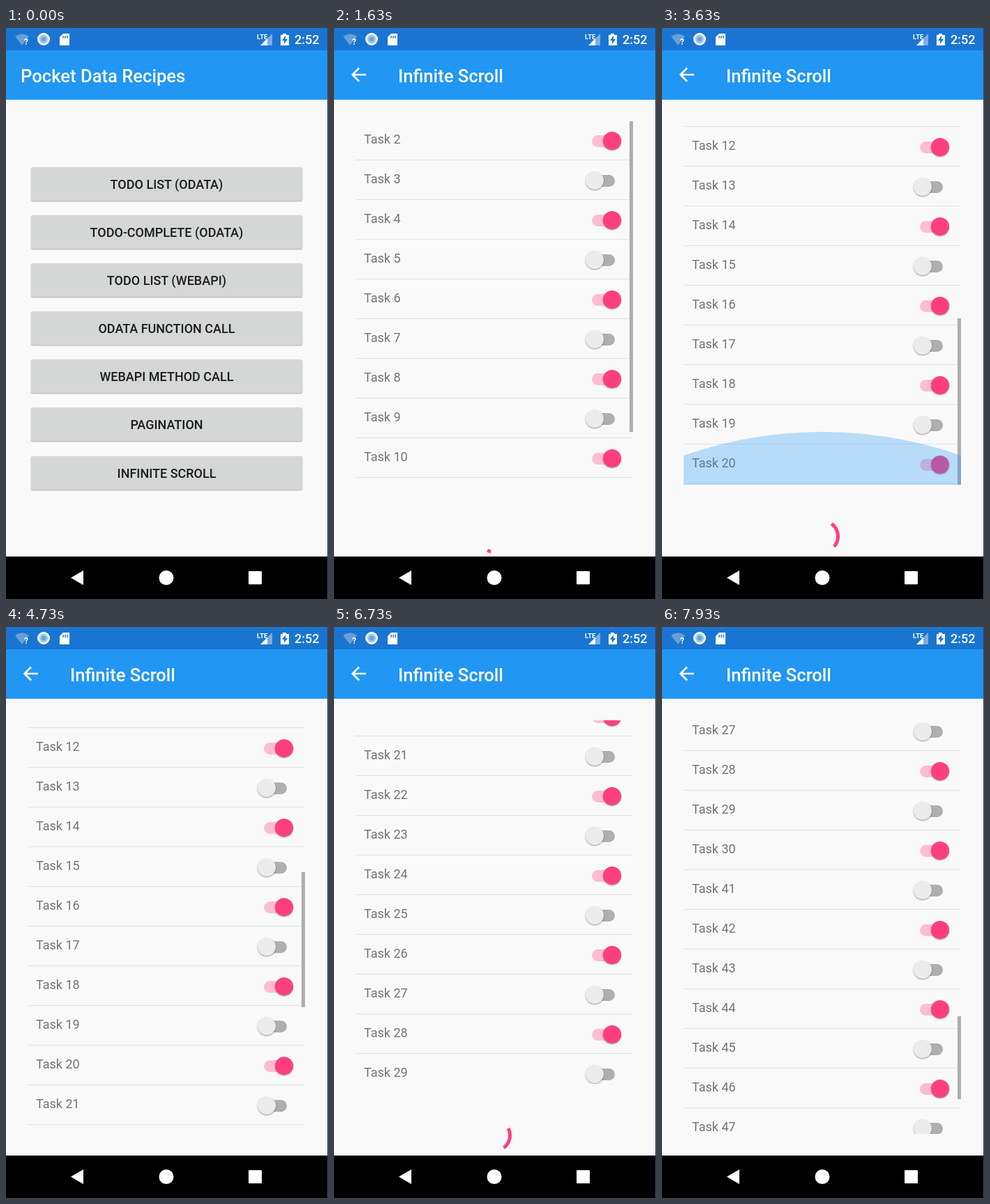
Write an HTML page that moves like this. It is 462 px wide and 820 px high and loops after 8 s.

```html
<!DOCTYPE html>
<html lang="en">
<head>
<meta charset="utf-8">
<title>Infinite scroll demo</title>
<style>
  :root { --loop: 8s linear infinite; --paper: #f9f9fa; --pink: #fd3f80; --status: #1a75d2; }
  html, body { margin: 0; width: 100%; height: 100%; overflow: hidden; }
  body { position: relative; background: var(--paper); font-family: Roboto, sans-serif; }
  #stage { position: absolute; inset: 0 auto auto 0; width: 462px; height: 820px; overflow: hidden; background: var(--paper); }
  #stage * { box-sizing: border-box; }
  #stage > * { position: absolute; }

  /* Fixed chrome */
  .status { left: 0; top: 0; width: 462px; height: 32px; background: var(--status); }
  .toolbar { left: 0; top: 32px; width: 462px; height: 71px; background: #2196f3; }
  .title { top: 33px; height: 73px; line-height: 73px; font-size: 25.6px; font-weight: 500; color: #fff; white-space: nowrap; }
  .nav { left: 0; top: 759px; width: 462px; height: 61px; background: #000; }
  .edge { left: 461px; top: 0; width: 1px; height: 820px; background: #34466a; }
  .icons { left: 0; top: 0; }
  .clock { font: 500 18px Roboto, sans-serif; }
  .lte { font: 700 9.5px Roboto, sans-serif; }

  /* Menu page */
  .menu { left: 36px; top: 200px; width: 389px; }
  .button {
    position: relative; height: 48px; margin-bottom: 21.1px; overflow: hidden; border-radius: 2px;
    background: #d5d6d6; box-shadow: 0 1px 2px #0005; line-height: 49px;
    text-align: center; font-size: 18px; font-weight: 500; color: #1c1c1c;
  }
  .ripple { position: absolute; left: -16px; top: -186px; width: 420px; height: 420px; border-radius: 50%; background: #0002; animation: ripple var(--loop); }
  .home-title { left: 21px; animation: leave var(--loop); }

  /* List page */
  .page { left: 0; top: 103px; width: 462px; height: 656px; background: var(--paper); animation: enter var(--loop); }
  .page-title { left: 92px; animation: enter var(--loop); }
  .arrow { animation: enter var(--loop); }
  .view { position: absolute; left: 31px; top: 31px; width: 398px; height: 594px; overflow: hidden; }
  .busy .view { height: 522px; }
  .list { margin: 0; padding: 0; list-style: none; animation: scroll var(--loop), load var(--loop); }
  .row { position: relative; height: 57px; padding-left: 12px; border-bottom: 1px solid #e2e2e4; line-height: 54px; font-size: 18px; color: #737373; }
  .track { position: absolute; left: 339px; top: 21px; width: 33px; height: 17px; border-radius: 9px; background: #afafaf; }
  .thumb { position: absolute; left: 330px; top: 16px; width: 26px; height: 26px; border-radius: 50%; background: #ebebeb; box-shadow: 0 1px 2px #0006; }
  .on .track { background: #fcbdd2; }
  .on .thumb { left: 355px; background: var(--pink); }
  .bar { position: absolute; right: 0; width: 5px; background: #aeaeae; animation: bar var(--loop); }
  .glow { position: absolute; left: -400px; bottom: -1198px; width: 1198px; height: 1198px; border-radius: 50%; background: #2196f34d; animation: glow var(--loop); }
  .spinner { position: absolute; left: 200px; top: 597px; visibility: hidden; }
  .busy .spinner { visibility: visible; }

  @keyframes ripple {
    0%, .9% { transform: scale(0); opacity: 1; }
    3.6% { transform: scale(1); opacity: 1; }
    6%, 100% { transform: scale(1); opacity: 0; }
  }
  @keyframes leave { 0%, 4.1% { opacity: 1; } 5.6%, 100% { opacity: 0; } }
  @keyframes enter { 0%, 4.1% { opacity: 0; } 6.6%, 100% { opacity: 1; } }
  @keyframes load { 0%, 16.24% { opacity: 0; } 16.25%, 100% { opacity: 1; } }
  @keyframes scroll {
    0%, 18.1% { transform: none; }
    20.3%, 37.1% { transform: translateY(-58px); }
    38.75% { transform: translateY(-130px); }
    43.75%, 57.9% { transform: translateY(-619px); }
    59.125% { transform: translateY(-615px); }
    63.375%, 65.875% { transform: translateY(-900px); }
    69.125% { transform: translateY(-1270px); }
    71.75%, 94.6% { transform: translateY(-1687px); }
    99.1%, 100% { transform: translateY(-2065px); }
  }
  @keyframes bar {
    0%, 16.24% { top: 0; height: 446px; opacity: 0; }
    16.25%, 22.5% { top: 0; height: 446px; opacity: 1; }
    25.6% { top: 0; height: 446px; opacity: 0; }
    37.1% { top: 30px; height: 290px; opacity: 0; }
    37.4% { top: 30px; height: 290px; opacity: 1; }
    43% { top: 296px; height: 290px; opacity: 1; }
    43.75%, 48.7% { top: 283px; height: 241px; opacity: 1; }
    51.9% { top: 283px; height: 241px; opacity: 0; }
    57.9% { top: 218px; height: 194px; opacity: 0; }
    58.3%, 59.125% { top: 218px; height: 194px; opacity: 1; }
    63.3% { top: 313px; height: 194px; opacity: 1; }
    63.375%, 65.875% { top: 234px; height: 147px; opacity: 1; }
    69.125% { top: 329px; height: 147px; opacity: 1; }
    71.7% { top: 439px; height: 147px; opacity: 1; }
    71.8%, 75.5% { top: 386px; height: 121px; opacity: 1; }
    78.7% { top: 386px; height: 121px; opacity: 0; }
    94.6% { top: 351px; height: 119px; opacity: 0; }
    95% { top: 354px; height: 119px; opacity: 1; }
    99.1%, 100% { top: 425px; height: 119px; opacity: 1; }
  }
  @keyframes glow {
    0%, 43.6% { transform: none; opacity: 0; }
    45.1%, 45.8% { transform: translateY(-76px); opacity: 1; }
    53%, 100% { transform: none; opacity: 0; }
  }
</style>
</head>
<body>
<div id="stage">
  <div class="menu"></div>
  <div class="page">
    <div class="view">
      <ul class="list"></ul>
      <div class="bar"></div>
      <div class="glow"></div>
    </div>
    <svg class="spinner" width="60" height="60">
      <circle class="arc" cx="30" cy="30" r="22.5" pathLength="360" fill="none" stroke="#fd3f80" stroke-width="5"/>
    </svg>
  </div>
  <div class="status"></div>
  <div class="toolbar"></div>
  <div class="title home-title">Pocket Data Recipes</div>
  <div class="title page-title">Infinite Scroll</div>
  <div class="nav"></div>
  <svg class="icons" width="462" height="820" fill="#fff">
    <path d="M13 12Q23 5 33 12L23 25Z" fill="#689fdb"/>
    <text class="lte" x="26" y="24" style="font-size:12px">?</text>
    <circle cx="54" cy="16" r="7.7" fill="#a6c8ec" stroke="#fff" stroke-width="2.6"/>
    <circle cx="54" cy="16" r="3.5" fill="#6aa4e0"/>
    <path d="M82 8H91V25H77V13Z"/>
    <path d="M82 11v4M85 11v4M88 11v4" stroke="#1a75d2" stroke-width="1.4"/>
    <text class="lte" x="360" y="16">LTE</text>
    <path d="M382 8V25H365Z" fill="#7aaee4"/>
    <path d="M375 15V25H365Z"/>
    <path d="M397 8h5v2h4v15h-12V10h3Z"/>
    <path d="M401 11l-5 7h3v5l5-7h-3Z" fill="#1a75d2"/>
    <text class="clock" x="414" y="23">2:52</text>
    <path class="arrow" d="M46 67H27M36 57.5L26.5 67L36 76.5" fill="none" stroke="#fff" stroke-width="2.6"/>
    <path d="M93 789.5L111 779V800Z"/>
    <circle cx="230" cy="789.5" r="10.5"/>
    <rect x="348" y="780" width="19" height="19" rx="1"/>
  </svg>
  <div class="edge"></div>
</div>
<script>
  const LOOP = 8000;
  const LOADS = [[365, 2770], [3445, 4550], [5743, 7030]];
  const MENU = ['TODO LIST (ODATA)', 'TODO-COMPLETE (ODATA)', 'TODO LIST (WEBAPI)',
    'ODATA FUNCTION CALL', 'WEBAPI METHOD CALL', 'PAGINATION', 'INFINITE SCROLL'];
  const $ = selector => document.querySelector(selector);

  $('.menu').innerHTML = MENU.map(label => `<div class="button">${label}</div>`).join('');
  $('.button:last-child').insertAdjacentHTML('beforeend', '<i class="ripple"></i>');

  // The fourth batch repeats the numbers of the third.
  const taskNumber = i => i >= 30 && i < 40 ? i - 9 : i + 1;
  $('.list').innerHTML = Array.from({ length: 50 }, (_, i) => {
    const n = taskNumber(i);
    return `<li class="row ${n % 2 ? '' : 'on'}">Task ${n}<i class="track"></i><i class="thumb"></i></li>`;
  }).join('');

  // cubic-bezier(.4, 0, .2, 1), solved by bisection
  function ease(x) {
    let low = 0, high = 1;
    for (let i = 0; i < 20; i++) {
      const s = (low + high) / 2, r = 1 - s;
      if (1.2 * r * r * s + 0.6 * r * s * s + s ** 3 < x) low = s; else high = s;
    }
    return low * low * (3 - 2 * low);
  }

  const arc = $('.arc');
  function drawSpinner(age) {
    const phase = age / 1333 % 1;
    const head = 270 * ease(Math.min(1, phase * 2));
    const tail = 270 * ease(Math.max(0, phase * 2 - 1));
    const turn = age / 4444 * 720 + phase * 90 - 90;
    const length = Math.max(head - tail, 0.1) + 12;
    arc.setAttribute('stroke-dasharray', `${length} 360`);
    arc.setAttribute('transform', `rotate(${turn + tail - 6} 30 30)`);
  }

  let start;
  function frame(now) {
    start ??= now;
    const time = (now - start) % LOOP;
    const load = LOADS.find(([from, to]) => time >= from && time < to);
    $('.page').classList.toggle('busy', Boolean(load));
    if (load) drawSpinner(time - load[0]);
    requestAnimationFrame(frame);
  }
  requestAnimationFrame(frame);
</script>
</body>
</html>
```
